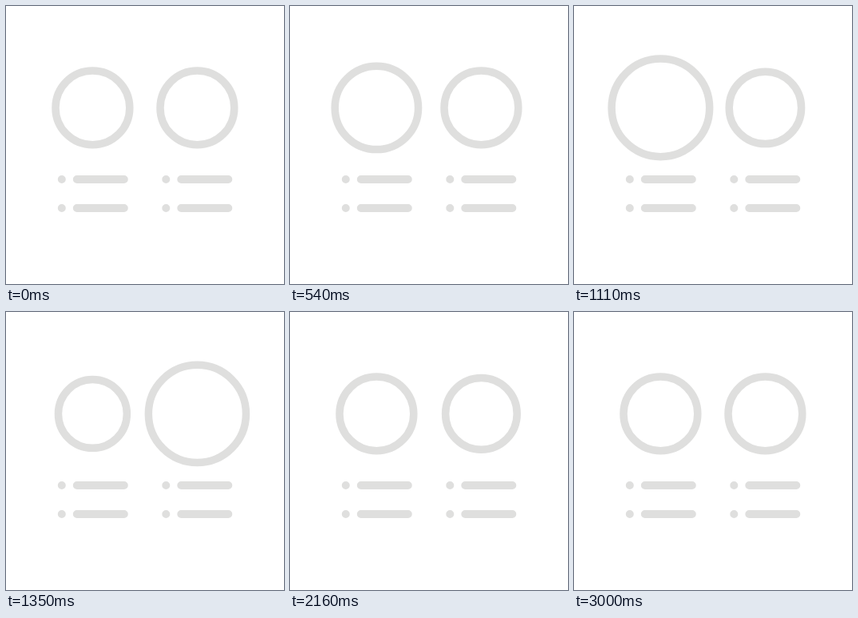
Recreate the animation shown at these times as an HTML page. Size 348 by 348 pixels, loop 3.09 s.

```html
<!DOCTYPE html>
<html lang="en">
<head>
<meta charset="utf-8">
<title>Pulsing rings</title>
<style>
  html, body { margin: 0; width: 100%; height: 100%; overflow: hidden; background: #fff; }
  svg { display: block; width: 100vw; height: 100vh; }
</style>
</head>
<body>
<svg viewBox="0 0 348 348" fill="none" stroke="#dfdfde" stroke-width="9.5" stroke-linecap="round">
  <defs>
    <path id="list" d="M0 0h.01M19 0H78M0 36h.01M19 36H78" stroke-width="10"/>
  </defs>
  <circle id="left" cx="108.4" cy="127.4"/>
  <circle id="right" cx="239.4" cy="127.4"/>
  <use href="#list" x="69.8" y="217"/>
  <use href="#list" x="200.3" y="217"/>
</svg>
<script>
const LOOP = 3090;
const REST = 46.4;

// Each ring dips, swells, springs back and settles: [ms, change in radius]
const pulses = {
  left: [[0, 0], [240, -2], [990, 20.4], [1370, -3.6], [1700, 2.3], [2040, 0]],
  right: [[900, 0], [1060, -2], [1460, 18.1], [2130, -1.7], [2480, 3.2], [2960, 0]]
};

const easeInOut = u => (1 - Math.cos(Math.PI * u)) / 2;
const clamp = u => Math.min(1, Math.max(0, u));

function swell(turns, t) {
  return turns.slice(1).reduce((sum, [end, to], i) => {
    const [begin, from] = turns[i];
    return sum + (to - from) * easeInOut(clamp((t - begin) / (end - begin)));
  }, 0);
}

function render(t) {
  for (const id in pulses) {
    document.getElementById(id).setAttribute("r", REST + swell(pulses[id], t));
  }
}

const start = performance.now();
function tick() {
  render((performance.now() - start) % LOOP);
  requestAnimationFrame(tick);
}
tick();
</script>
</body>
</html>
```
